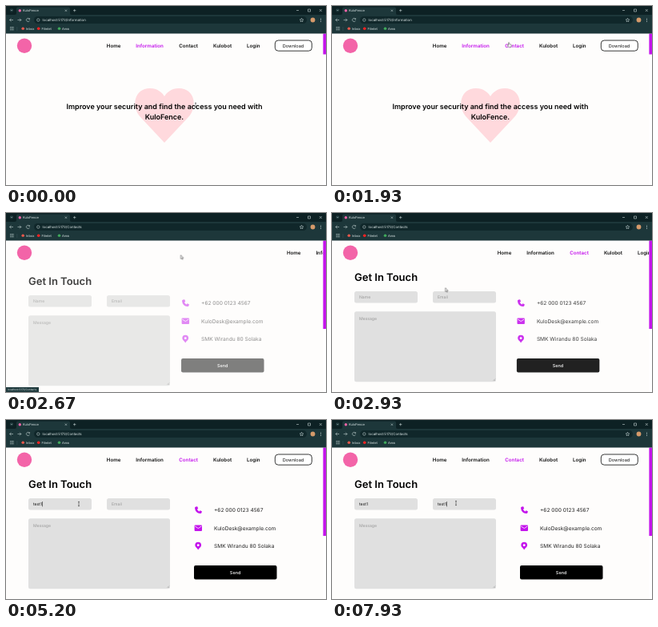
These frames come from a looping animation (400 by 224 pixels, 8 s). An HTML page:

```html
<!DOCTYPE html>
<html lang="en">
<head>
<meta charset="utf-8">
<title>KuloFence</title>
<style>
  html, body { margin: 0; width: 100%; height: 100%; overflow: hidden; background: #fefdfc; }
  svg { display: block; width: 100vw; height: 100vh; }
  text { font-family: Inter, Roboto, sans-serif; text-rendering: geometricPrecision; white-space: pre; }

  .bar text { font-size: 4px; fill: #dfe9e9; }
  .bar .url { font-size: 4.35px; }
  .thin { fill: none; stroke: #c3d2d2; stroke-width: .6; }
  .nav text { font-size: 6.2px; font-weight: 600; fill: #111; }
  .nav .button { font-size: 5.6px; font-weight: 400; }
  .headline { font-size: 8.97px; font-weight: 600; text-anchor: middle; }
  .title { font-size: 13px; font-weight: 600; }
  .field { fill: #e0e0e0; }
  .hint { font-size: 5.1px; fill: #999; }
  .hint.typed { fill: #151515; }
  .details text { font-size: 6.6px; fill: #222; }
  .details .send { font-size: 5.5px; font-weight: 500; fill: #fff; text-anchor: middle; }
  .accent { fill: #c414ec; }

  .timed { animation: 8s step-end infinite; }
  .first { animation-name: first; }
  .second { animation-name: second; }
  .status { animation-name: status; }
  .nav .info { animation-name: info; }
  .nav .contact { animation-name: contact; }
  .thumb { animation-name: thumb; }
  .nav { animation: nav 8s infinite; }
  .form { animation: form 8s infinite; }
  .details { animation: details 8s infinite; }
  .cursor { animation: travel 8s linear infinite; }
  .arrow { animation-name: arrow; }
  .hand { animation-name: hand; }
  .beam { animation-name: beam; }

  @keyframes first { 0% { visibility: visible } 30%, 100% { visibility: hidden } }
  @keyframes second { 0% { visibility: hidden } 30%, 100% { visibility: visible } }
  @keyframes status { 0% { visibility: hidden } 26% { visibility: visible } 34.5%, 100% { visibility: hidden } }
  @keyframes info { 0% { fill: #c414ec } 30%, 100% { fill: #111 } }
  @keyframes contact { 0% { fill: #111 } 23.3%, 100% { fill: #c414ec } }
  @keyframes thumb { 0% { height: 26px } 30%, 100% { height: 110.5px } }

  @keyframes nav {
    0%, 29.99% { transform: none; animation-timing-function: step-end }
    30% { transform: translateX(451px); animation-timing-function: cubic-bezier(.5, 1, .89, 1) }
    41.5%, 100% { transform: none }
  }
  @keyframes form {
    0%, 30.25% { transform: translateY(20px); opacity: 0; animation-timing-function: cubic-bezier(.5, 1, .89, 1) }
    36.5%, 100% { transform: none; opacity: 1 }
  }
  @keyframes details {
    0%, 30.625% { transform: translateX(-32px); opacity: 0; animation-timing-function: cubic-bezier(.5, 1, .89, 1) }
    40%, 100% { transform: none; opacity: 1 }
  }
  @keyframes travel {
    0%, 4.5% { transform: translate(237px, 124px) }
    8.4%, 10.2% { transform: translate(214px, 138px) }
    15% { transform: translate(196px, 96px) }
    20.8% { transform: translate(190px, 50px) }
    24.1%, 30% { transform: translate(221px, 45.5px) }
    33.3% { transform: translate(220.5px, 51.5px) }
    36.6% { transform: translate(142px, 93.5px) }
    42.5%, 69.2% { transform: translate(91px, 105px) }
    74.2%, 100% { transform: translate(155px, 104px) }
  }
  @keyframes arrow {
    0% { visibility: hidden } 10.9% { visibility: visible } 20.3% { visibility: hidden }
    30% { visibility: visible } 41% { visibility: hidden }
    70.6% { visibility: visible } 72% { visibility: hidden } 100% { visibility: hidden }
  }
  @keyframes hand { 0% { visibility: hidden } 20.3% { visibility: visible } 30%, 100% { visibility: hidden } }
  @keyframes beam {
    0% { visibility: visible } 10.9% { visibility: hidden } 41% { visibility: visible }
    70.6% { visibility: hidden } 72%, 100% { visibility: visible }
  }
</style>
</head>
<body>
<svg viewBox="0 0 400 224" preserveAspectRatio="none">
  <rect width="400" height="224" fill="#fefdfc"/>

  <g class="timed first">
    <path fill="#ffd9dd" d="M198 171 L168 139 C156 126 160 103 180 103 C189 103 195 108 198 113 C201 108 207 103 216 103 C236 103 240 126 228 139 Z"/>
    <text class="headline" x="198" y="129.4">Improve your security and find the access you need with</text>
    <text class="headline" x="198" y="142.4">KuloFence.</text>
  </g>

  <g class="timed second">
    <g class="form">
      <text class="title" x="28" y="84.6">Get In Touch</text>
      <rect class="field" x="28" y="98" width="79" height="14.5" rx="2.5"/>
      <rect class="field" x="126" y="98" width="79" height="14.5" rx="2.5"/>
      <rect class="field" x="28" y="123.3" width="177" height="88" rx="2.5"/>
      <path d="M201.5 210 L204 207.5 M203 210 L204 209" stroke="#777" stroke-width=".4"/>
      <text class="hint" id="name" x="34" y="107.1">Name</text>
      <text class="hint" id="email" x="132" y="107.1">Email</text>
      <text class="hint" x="34" y="134">Message</text>
      <rect id="caret" y="102" width=".5" height="6.4"/>
    </g>
    <g class="details">
      <path class="accent" d="M237.4 108.6 L239.2 108.2 L240.2 110.8 L238.9 111.8 Q239.7 113.6 241.5 114.5 L242.5 113.2 L244.9 114.2 L244.4 116.2 Q244 117.1 242.8 117 Q236.6 116.4 236 109.9 Q236.1 108.9 237.4 108.6 Z"/>
      <rect class="accent" x="235.6" y="131.5" width="9.4" height="7.4" rx=".9"/>
      <path d="M236.2 132.9 L240.3 135.6 L244.4 132.9" fill="none" stroke="#fff" stroke-width=".8"/>
      <path class="accent" d="M240.2 162.4 C238.8 160 236.3 158.8 236.3 156.7 A3.9 3.9 0 0 1 244.1 156.7 C244.1 158.8 241.6 160 240.2 162.4 Z"/>
      <circle cx="240.2" cy="156.7" r="1.4" fill="#fff"/>
      <text x="260" y="115">+62 000 0123 4567</text>
      <text x="260" y="137.5">KuloDesk@example.com</text>
      <text x="260" y="160">SMK Wirandu 80 Solaka</text>
      <rect x="235" y="182" width="103.5" height="17.6" rx="2"/>
      <text class="send" x="286.6" y="192.9">Send</text>
    </g>
  </g>

  <circle cx="23" cy="49.8" r="9.2" fill="#f364a8"/>
  <g class="nav">
    <text x="125.8" y="52.2">Home</text>
    <text class="timed info" x="162.3" y="52.2">Information</text>
    <text class="timed contact" x="216.3" y="52.2">Contact</text>
    <text x="259" y="52.2">Kulobot</text>
    <text x="301" y="52.2">Login</text>
    <rect x="336.3" y="43" width="46" height="13.2" rx="4" fill="#fff" stroke="#222" stroke-width=".9"/>
    <text class="button" x="345.8" y="51.8">Download</text>
  </g>

  <rect x="396.4" y="34.5" width="3.6" height="189.5" fill="#fff"/>
  <rect class="timed thumb accent" x="396.4" y="34.5" width="3.6" height="26"/>

  <g class="timed status">
    <rect y="218" width="41" height="6" fill="#203b3e"/>
    <text x="2" y="222.2" font-size="3.2" fill="#d5e0e0">localhost:5173/Contacts</text>
  </g>

  <g class="bar">
    <rect width="400" height="34.5" fill="#1d373a"/>
    <rect width="400" height="11" fill="#0d2124"/>
    <path d="M11 11 Q13 11 13 9 V3.5 Q13 1.5 15 1.5 H78 Q80 1.5 80 3.5 V9 Q80 11 82 11 Z" fill="#1d373a"/>
    <circle cx="7" cy="5.3" r="2.2" fill="#1d373a"/>
    <circle cx="17.3" cy="5.8" r="1.7" fill="#f364a8"/>
    <text x="21" y="7.2">KuloFence</text>
    <path class="thin" d="M6 4.8 L7 5.8 L8 4.8 M73.8 4.6 L76 6.8 M76 4.6 L73.8 6.8 M84 5.6 H87.4 M85.7 3.9 V7.3
      M363 5.5 H366 M377.5 4 H380.5 V7 H377.5 Z M391.8 4 L394.8 7 M394.8 4 L391.8 7"/>
    <rect x="35" y="13" width="341" height="9" rx="4.5" fill="#10272a"/>
    <path class="thin" d="M9 17.5 H4.6 M6.5 15.6 L4.6 17.5 L6.5 19.4 M14.5 17.5 H18.9 M17 15.6 L18.9 17.5 L17 19.4
      M29.4 16.4 A2.1 2.1 0 1 0 29.5 18.3 M29.6 15.2 V16.6 H28.2"/>
    <circle class="thin" cx="40.3" cy="17.5" r="1.7"/>
    <text class="url timed first" x="45.5" y="19.1">localhost:5173/Information</text>
    <text class="url timed second" x="45.5" y="19.1">localhost:5173/Contacts</text>
    <path class="thin" d="M369.5 15.3 L370.2 16.8 L371.8 17 L370.6 18.1 L370.9 19.7 L369.5 18.9 L368.1 19.7 L368.4 18.1 L367.2 17 L368.8 16.8 Z"/>
    <circle cx="383.5" cy="17.5" r="2.9" fill="#d59a6a"/>
    <path d="M393.5 15.6 V20" stroke="#c3d2d2" stroke-dasharray=".8 .9"/>
    <path d="M5.2 26.5 H9.6 M5.2 28.2 H9.6 M5.2 29.9 H9.6" stroke="#b3c5c5" stroke-dasharray="1 .7"/>
    <path d="M13.8 26 V31" stroke="#486366" stroke-width=".4"/>
    <circle cx="21.2" cy="28.3" r="1.8" fill="#e6584c"/>
    <text x="25" y="29.8">Inbox</text>
    <circle cx="40.7" cy="28.3" r="1.8" fill="#f22"/>
    <text x="44.5" y="29.8">Filmlet</text>
    <circle cx="66.5" cy="28.3" r="1.8" fill="#3fa85b"/>
    <text x="70" y="29.8">Area</text>
  </g>

  <g class="cursor">
    <path class="timed arrow" d="M0 0 V4.8 L1.1 3.8 L1.9 5.5 L2.7 5.1 L1.9 3.5 H3.4 Z" fill="#fff" stroke="#222" stroke-width=".45"/>
    <path class="timed hand" d="M-.5 .4 Q0 -.4 .6 .4 V2.2 L3 2.8 Q3.5 3 3.3 4 L2.8 6 H-.2 L-1.9 3.9 Q-1.7 3 -.5 3.8 Z" fill="#fff" stroke="#222" stroke-width=".45"/>
    <path class="timed beam" d="M-1 -2.6 H1 M0 -2.6 V2.6 M-1 2.6 H1" fill="none" stroke="#222" stroke-width=".55"/>
  </g>
</svg>
<script>
  const LOOP = 8000, BLINK = 530, WORD = 'test1';
  const start = performance.now();
  const caret = document.getElementById('caret');
  const fields = [
    { id: 'name', hint: 'Name', focus: 4070, blur: 6070, keys: [4270, 4400, 4600, 4730, 5200] },
    { id: 'email', hint: 'Email', focus: 6070, blur: LOOP, keys: [6730, 6870, 7000, 7130, 7470] }
  ].map(f => ({ ...f, el: document.getElementById(f.id) }));

  function drawField({ el, hint, focus, blur, keys }, t) {
    const typed = keys.filter(k => k <= t).length;
    const value = WORD.slice(0, typed) || hint;
    if (el.textContent !== value) el.textContent = value;
    el.classList.toggle('typed', typed > 0);
    if (t < focus || t >= blur) return;
    const last = typed ? keys[typed - 1] : focus;
    const width = typed ? el.getComputedTextLength() : 0;
    caret.setAttribute('x', +el.getAttribute('x') + width);
    caret.setAttribute('opacity', (t - last) % (2 * BLINK) < BLINK ? 1 : 0);
  }

  function render() {
    const t = (performance.now() - start) % LOOP;
    caret.setAttribute('opacity', 0);
    fields.forEach(f => drawField(f, t));
    requestAnimationFrame(render);
  }
  render();
</script>
</body>
</html>
```
